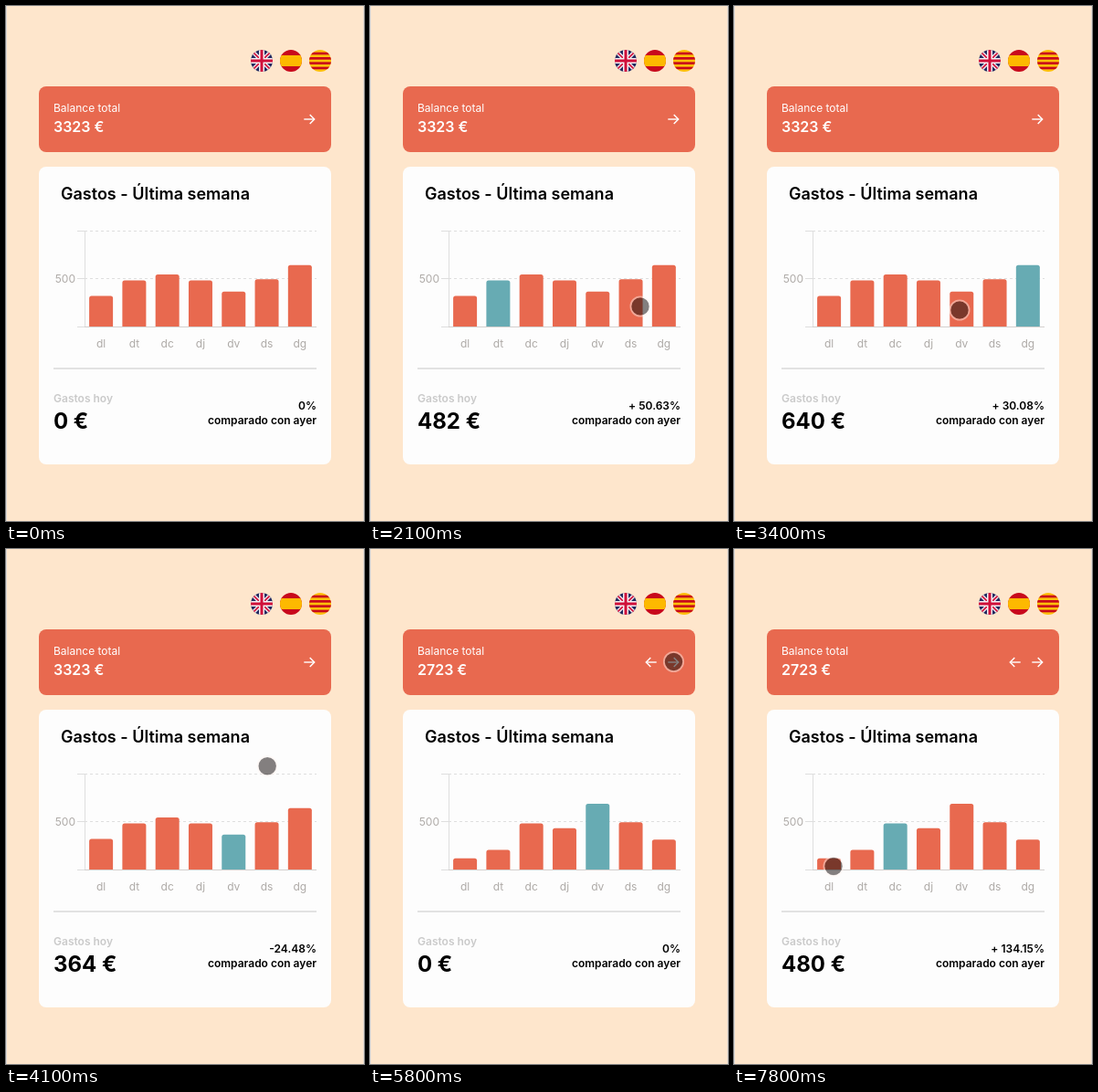
An HTML page with a canvas that plays this animation: 392x564 px, repeating every 8 s.

```html
<!DOCTYPE html>
<html lang="es">
<head>
<meta charset="utf-8">
<title>Gastos</title>
<style>
html, body { margin: 0; width: 100%; height: 100%; overflow: hidden; background: #fee6cc; }
canvas { display: block; width: 392px; height: 564px; }
</style>
</head>
<body>
<canvas id="stage"></canvas>
<script>
const W = 392, H = 564, LOOP = 8000;
const RED = '#e8694f', TEAL = '#67abb3', CARD = '#fdfdfd', MUTED = '#aeaaa7';
const DAYS = ['dl', 'dt', 'dc', 'dj', 'dv', 'ds', 'dg'];
const WEEKS = [
  [320, 482, 543, 482, 364, 492, 640],
  [117, 205, 480, 431, 686, 492, 312]
];
const WEEK_SWITCH = 4783, GROW = 1000;

// Selected bar and whether its amount is shown, from a given time on.
const SELECTIONS = [
  { at: 0, day: -1, shown: false },
  { at: 1450, day: 1, shown: true },
  { at: 2500, day: 6, shown: true },
  { at: 3550, day: 4, shown: true },
  { at: WEEK_SWITCH, day: 4, shown: false },
  { at: 7100, day: 2, shown: true }
];

const TOUCH_START = 1250, CURSOR_START = 950;
const TOUCH_PATH = [
  [1250, 132, 320], [1650, 134, 321], [2100, 296, 329], [2300, 322, 326],
  [2900, 322, 326], [3400, 247, 333], [3750, 248, 332], [4500, 332.5, 123.5],
  [6350, 332.5, 123.5], [6800, 195, 320], [7000, 179, 324], [7200, 177, 325],
  [7600, 88, 361], [7800, 109, 347.5]
];

const canvas = document.getElementById('stage');
const ctx = canvas.getContext('2d');
const ratio = window.devicePixelRatio || 1;
canvas.width = W * ratio;
canvas.height = H * ratio;

const mix = (a, b, k) => a + (b - a) * k;
const smooth = k => k * k * (3 - 2 * k);

// cubic-bezier(.25, .1, .25, 1)
function ease(x) {
  if (x <= 0) return 0;
  if (x >= 1) return 1;
  const curve = (s, a, b) => 3 * (1 - s) ** 2 * s * a + 3 * (1 - s) * s * s * b + s ** 3;
  let lo = 0, hi = 1;
  for (let i = 0; i < 24; i++) {
    const mid = (lo + hi) / 2;
    if (curve(mid, .25, .25) < x) lo = mid; else hi = mid;
  }
  return curve(lo, .1, 1);
}

function rect(x, y, w, h, color) {
  ctx.fillStyle = color;
  ctx.fillRect(x, y, w, h);
}

function rounded(x, y, w, h, radii, color) {
  ctx.fillStyle = color;
  ctx.beginPath();
  ctx.roundRect(x, y, w, h, radii);
  ctx.fill();
}

function line(points, color, width, dash = []) {
  ctx.strokeStyle = color;
  ctx.lineWidth = width;
  ctx.setLineDash(dash);
  ctx.beginPath();
  points.forEach(([x, y]) => ctx.lineTo(x, y));
  ctx.stroke();
  ctx.setLineDash([]);
}

function text(str, x, y, size, weight, color, align = 'left') {
  ctx.font = `${weight} ${size}px Inter, sans-serif`;
  ctx.textAlign = align;
  ctx.fillStyle = color;
  ctx.fillText(str, x, y);
}

function flag(cx, paint) {
  ctx.save();
  ctx.translate(cx, 60);
  ctx.beginPath();
  ctx.arc(0, 0, 12, 0, Math.PI * 2);
  ctx.clip();
  paint();
  ctx.restore();
}

function britishFlag() {
  rect(-12, -12, 24, 24, '#22295f');
  for (const [color, width] of [['#f4f1f4', 4.4], ['#d0103a', 1.6]]) {
    line([[-12, -12], [12, 12]], color, width);
    line([[-12, 12], [12, -12]], color, width);
  }
  for (const [color, width] of [['#f4f1f4', 6], ['#d0103a', 3]]) {
    line([[-12, 0], [12, 0]], color, width);
    line([[0, -12], [0, 12]], color, width);
  }
}

function spanishFlag() {
  rect(-12, -12, 24, 24, '#c8091c');
  rect(-12, -6, 24, 12, '#fdb900');
}

function catalanFlag() {
  const stripe = 24 / 9;
  rect(-12, -12, 24, 24, '#fdc00a');
  for (let i = 1; i < 9; i += 2) rect(-12, -12 + i * stripe, 24, stripe, '#c8091c');
}

function arrow(cx, dir) {
  const tip = cx + 5.7 * dir;
  line([[cx - 5.7 * dir, 124], [tip, 124]], '#fff', 1.4);
  line([[tip - 5 * dir, 119], [tip, 124], [tip - 5 * dir, 129]], '#fff', 1.4);
}

function balanceCard(week) {
  rounded(36, 88, 320, 72, 8, RED);
  const total = WEEKS[week].reduce((a, b) => a + b);
  text('Balance total', 52, 116, 12, 400, '#fff');
  text(`${total} €`, 52, 138, 16, 600, '#fff');
  if (week) arrow(308, -1);
  arrow(332, 1);
}

function chart(growth, selected) {
  line([[86, 246.5], [340, 246.5]], '#dedede', 1, [3, 3]);
  line([[86, 298.5], [340, 298.5]], '#dedede', 1, [3, 3]);
  line([[86.5, 246], [86.5, 351]], '#dedede', 1);
  for (const y of [246.5, 298.5, 351.5]) line([[78, y], [86, y]], '#dedede', 1);
  text('500', 76, 303, 12, 400, MUTED, 'right');
  DAYS.forEach((day, i) => {
    const x = 91.1 + i * 36.29;
    const height = mix(WEEKS[0][i], WEEKS[1][i], growth) * .105;
    rounded(x, 351 - height, 26, height, [2.5, 2.5, 0, 0], i === selected ? TEAL : RED);
    text(day, x + 13, 374, 12, 400, MUTED, 'center');
  });
  line([[86, 351.5], [340, 351.5]], '#d4d0ce', 1);
}

function change(values, day) {
  const percent = (values[day] / values[day - 1] - 1) * 100;
  return `${percent > 0 ? '+ ' : ''}${percent.toFixed(2)}%`;
}

function expensesCard(week, growth, { day, shown }) {
  rounded(36, 176, 320, 326, 8, CARD);
  text('Gastos - Última semana', 60, 212, 18, 600, '#000');
  chart(growth, day);
  rect(52, 396, 288, 2, '#e2e2e2');
  const values = WEEKS[week];
  text('Gastos hoy', 52, 434, 12, 600, '#cacaca');
  text(`${shown ? values[day] : 0} €`, 52, 463, 24, 700, '#000');
  text(shown ? change(values, day) : '0%', 340, 442, 12, 600, '#000', 'right');
  text('comparado con ayer', 340, 458, 12, 600, '#000', 'right');
}

function moveCursor(x, y) {
  ctx.save();
  ctx.translate(x, y);
  ctx.lineJoin = 'round';
  const shape = new Path2D();
  for (let i = 0; i < 4; i++) {
    const turn = new DOMMatrix().rotate(i * 90);
    const part = new Path2D('M-1 0V-4H-3L0-7L3-4H1V0Z');
    shape.addPath(part, turn);
  }
  ctx.strokeStyle = '#fff';
  ctx.lineWidth = 2.4;
  ctx.stroke(shape);
  ctx.fillStyle = '#000';
  ctx.fill(shape);
  ctx.restore();
}

function touchPoint(time) {
  const next = TOUCH_PATH.findIndex(p => p[0] > time);
  if (next < 0) return TOUCH_PATH[TOUCH_PATH.length - 1].slice(1);
  const a = TOUCH_PATH[next - 1], b = TOUCH_PATH[next];
  const k = smooth((time - a[0]) / (b[0] - a[0]));
  return [mix(a[1], b[1], k), mix(a[2], b[2], k)];
}

function touch(x, y) {
  ctx.beginPath();
  ctx.arc(x, y, 9.8, 0, Math.PI * 2);
  ctx.fillStyle = 'rgba(20, 12, 12, .52)';
  ctx.fill();
  ctx.beginPath();
  ctx.arc(x, y, 10.6, 0, Math.PI * 2);
  ctx.strokeStyle = 'rgba(255, 245, 240, .45)';
  ctx.lineWidth = 1.8;
  ctx.stroke();
}

function draw(time) {
  const week = time >= WEEK_SWITCH ? 1 : 0;
  const growth = ease((time - WEEK_SWITCH) / GROW);
  const selection = SELECTIONS.filter(s => s.at <= time).pop();

  ctx.setTransform(ratio, 0, 0, ratio, 0, 0);
  rect(0, 0, W, H, '#fee6cc');
  rect(0, 0, 1, H, '#dbd9d8');
  rect(W - 1, 0, 1, H, '#e6dcd2');
  flag(280, britishFlag);
  flag(312, spanishFlag);
  flag(344, catalanFlag);
  balanceCard(week);
  expensesCard(week, growth, selection);
  if (time >= TOUCH_START) touch(...touchPoint(time));
  else if (time >= CURSOR_START) moveCursor(132, 320);
}

const start = performance.now();
function tick() {
  draw((performance.now() - start) % LOOP);
  requestAnimationFrame(tick);
}
tick();
</script>
</body>
</html>
```
